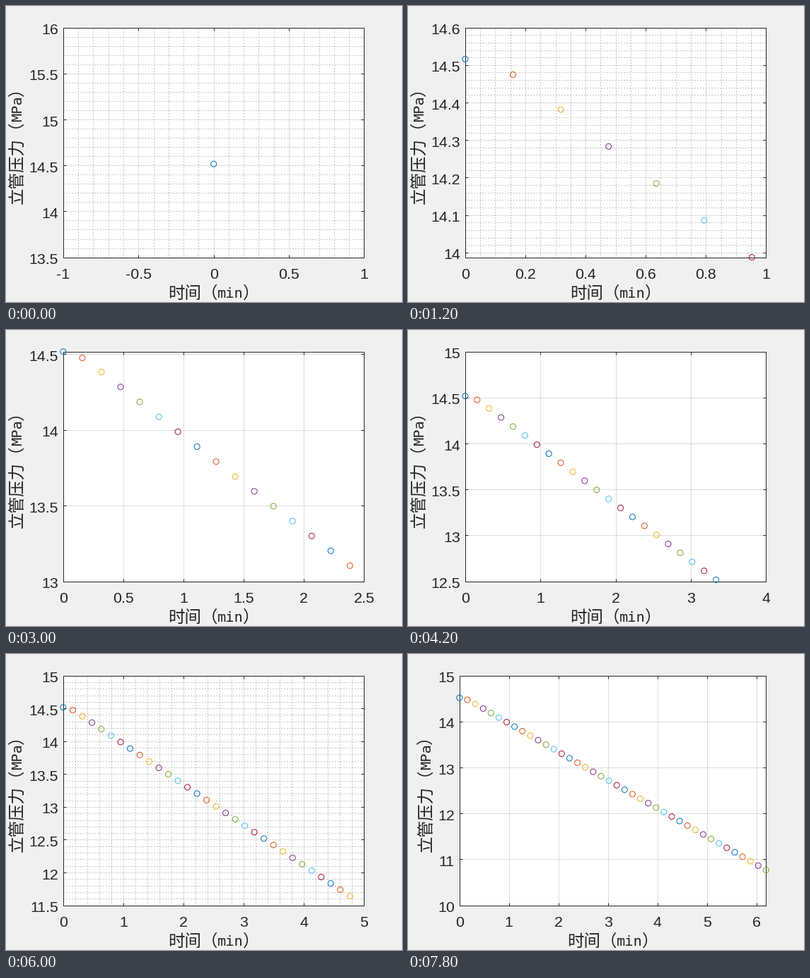
These frames come from a looping animation (560x420 px, 8 s). A matplotlib script:

```python
import math

import matplotlib.pyplot as plt
import numpy as np
from matplotlib.animation import FuncAnimation

W, H, DPI = 560, 420, 80
PT = 72 / DPI                      # points per pixel
COUNT, STEP_MS = 40, 200
TOP, BOTTOM, RIGHT = 30.6, 356.6, 506.4
MIN_LEFT, LABEL_LEFT, PAD = 72.8, 32.4, 7
TICK_PX, NAME_PX = 21.33, 23.5
INK = (0.15, 0.15, 0.15)
COLORS = ["#0072bd", "#d95319", "#edb120", "#7e2f8e",
          "#77ac30", "#4dbeee", "#a2142f"]

# Pressure falls almost linearly after a short start-up.
k = np.arange(COUNT)
times = 0.1588 * k
pressure = 14.2828 - 0.0986 * (k - 3) + 2.6e-5 * (k - 3) ** 2
pressure[:3] = 14.516, 14.4744, 14.3815
point_colors = [COLORS[i % len(COLORS)] for i in k]

fig = plt.figure(figsize=(W / DPI, H / DPI), dpi=DPI, facecolor="#f0f0f0")
ax = fig.add_axes([0.1, 0.1, 0.8, 0.8])


def auto_limits(data):
    """Round outwards to a nice step, staying tight where that wastes space."""
    lo, hi = data.min(), data.max()
    if lo == hi:
        lo, hi = lo - 1, hi + 1
    span = hi - lo
    unit = 10.0 ** math.floor(math.log10(span))
    size = span / unit
    step = unit * (0.2 if size <= 1.05 else 0.5 if size <= 3 else
                   1 if size <= 5 else 2)
    low = math.floor(lo / step + 1e-9) * step
    high = math.ceil(hi / step - 1e-9) * step
    return (low if lo - low <= span / 4 else lo,
            high if high - hi <= span / 4 else hi)


def multiples(lo, hi, step):
    first, last = math.ceil(lo / step - 1e-6), math.floor(hi / step + 1e-6)
    return [round(i * step, 9) + 0.0 for i in range(first, last + 1)]


def auto_ticks(lo, hi):
    """Major and minor ticks, with at most seven major intervals."""
    for power in range(-4, 3):
        for digit, parts in ((1, 5), (2, 4), (5, 5)):
            step = digit * 10.0 ** power
            if (hi - lo) / step <= 7 + 1e-6:
                major = multiples(lo, hi, step)
                minor = multiples(lo, hi, step / parts)
                return major, [v for v in minor if v not in major]


def text_width(s):
    return TICK_PX * sum(0.278 if c == "." else 0.556 for c in s)


def put(x, y, s, px, font="Liberation Sans", ha="center", turn=0):
    fig.text(x / W, 1 - y / H, s, fontsize=px * PT, family=font, color=INK,
             ha=ha, va="baseline", rotation=turn, rotation_mode="anchor")


def axis_name(x, y, name, unit, turn=0):
    """Full-width name and brackets around a half-width unit."""
    em = NAME_PX
    cjk = "Noto Sans CJK JP"
    runs = ((name + "（", cjk, em, em),
            (unit, "DejaVu Sans Mono", em / 1.15, em / 2),
            ("）", cjk, em, em))
    pos = -sum(len(s) * advance for s, _, _, advance in runs) / 2
    for s, font, px, advance in runs:
        mid = pos + len(s) * advance / 2
        if turn:
            put(x, y - mid, s, px, font, turn=turn)
        else:
            put(x + mid, y, s, px, font)
        pos += len(s) * advance


def style_axis(axis, major, minor):
    axis.set_ticks(major, labels=[""] * len(major))
    axis.set_ticks(minor, minor=True)
    axis.grid(True, which="major", color=INK, alpha=0.15, lw=PT)
    axis.grid(True, which="minor", color=(0.1, 0.1, 0.1), alpha=0.25,
              lw=PT, ls=(0.5, (2, 2)))


def draw(n):
    ax.clear()
    for t in list(fig.texts):
        t.remove()
    xs, ys = times[:n + 1], pressure[:n + 1]
    (x0, x1), (y0, y1) = auto_limits(xs), auto_limits(ys)
    x_major, x_minor = auto_ticks(x0, x1)
    y_major, y_minor = auto_ticks(y0, y1)
    if n % 2:                      # the minor grid toggles with every point
        x_minor, y_minor = [], []

    y_labels = [f"{v:g}" for v in y_major]
    width = max(map(text_width, y_labels))
    left = max(MIN_LEFT, LABEL_LEFT + width + PAD)

    ax.set_position([left / W, 1 - BOTTOM / H,
                     (RIGHT - left) / W, (BOTTOM - TOP) / H])
    ax.set_axisbelow(True)
    style_axis(ax.xaxis, x_major, x_minor)
    style_axis(ax.yaxis, y_major, y_minor)
    ax.tick_params(which="major", direction="in", length=4 * PT, width=PT,
                   color=INK, top=True, right=True)
    ax.tick_params(which="minor", length=0)
    for spine in ax.spines.values():
        spine.set(color=INK, linewidth=PT)
    ax.scatter(xs, ys, s=(8 * PT) ** 2, facecolors="none",
               edgecolors=point_colors[:n + 1], linewidths=PT,
               clip_on=False, zorder=5)
    ax.set_xlim(x0, x1)
    ax.set_ylim(y0, y1)

    for v in x_major:
        x = left + (v - x0) / (x1 - x0) * (RIGHT - left)
        put(x, BOTTOM + 30, f"{v:g}", TICK_PX)
    for v, s in zip(y_major, y_labels):
        y = BOTTOM - (v - y0) / (y1 - y0) * (BOTTOM - TOP)
        put(left - PAD, y + 9.5, s, TICK_PX, ha="right")
    axis_name((left + RIGHT) / 2, 414.5, "时间", "min")
    axis_name(left - PAD - width - 10, (TOP + BOTTOM) / 2 - 0.7,
              "立管压力", "MPa", turn=90)
    return []


anim = FuncAnimation(fig, draw, frames=COUNT, interval=STEP_MS,
                     init_func=lambda: draw(0), repeat=True, repeat_delay=0,
                     blit=False)
plt.show()
```
